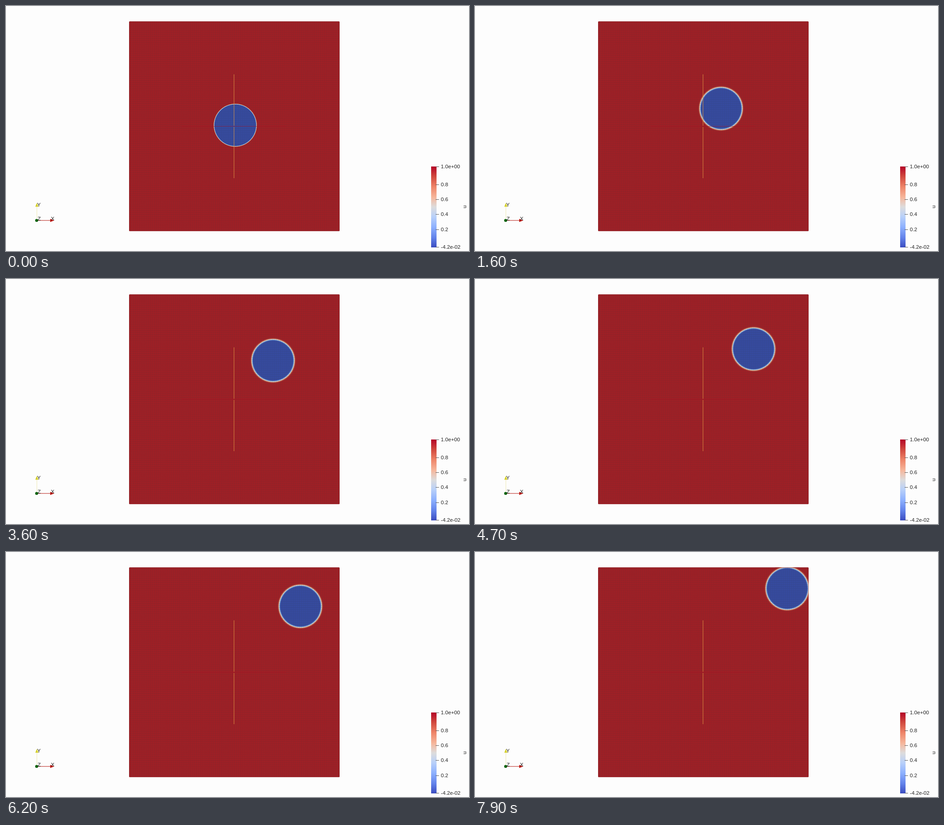
These frames come from a looping animation (1027 px wide and 545 px high, 8000 ms). An HTML page:

```html
<!DOCTYPE html>
<html lang="en">
<head>
<meta charset="utf-8">
<title>Transported disc</title>
<style>
  html, body { margin: 0; width: 100%; height: 100%; overflow: hidden; background: #fdfdfd; }
  svg { display: block; width: 100vw; height: 100vh; }
  text { font: 11.7px "Liberation Sans", Arial, sans-serif; fill: #222; }
</style>
</head>
<body>
<svg viewBox="0 0 1027 545">
  <defs>
    <radialGradient id="disc" gradientUnits="userSpaceOnUse" cx="0" cy="0" r="54"></radialGradient>
    <linearGradient id="scale" x1="0" y1="0" x2="0" y2="1">
      <stop offset="0" stop-color="#b40426"/>
      <stop offset=".12" stop-color="#d0473d"/>
      <stop offset=".25" stop-color="#ee8468"/>
      <stop offset=".38" stop-color="#f6b69b"/>
      <stop offset=".5" stop-color="#dddcdc"/>
      <stop offset=".62" stop-color="#b8d0f9"/>
      <stop offset=".75" stop-color="#8db0fe"/>
      <stop offset=".88" stop-color="#6282ea"/>
      <stop offset="1" stop-color="#3b4cc0"/>
    </linearGradient>
    <pattern id="mesh" x="273" y="34.5" width="4.66" height="4.66" patternUnits="userSpaceOnUse">
      <path d="M0 .6H4.66M.6 0V4.66" stroke="#28323c" stroke-opacity=".13"/>
    </pattern>
    <clipPath id="plate"><rect x="273" y="34.3" width="467" height="466.4" rx="1.5"/></clipPath>
  </defs>

  <rect width="1027" height="545" fill="#fdfdfd"/>

  <g clip-path="url(#plate)">
    <rect x="273" y="34" width="467" height="467" fill="#a01f25"/>
    <circle id="ball" r="54" fill="url(#disc)"/>
    <rect x="273" y="34" width="467" height="467" fill="url(#mesh)"/>
  </g>
  <rect x="273.5" y="34.8" width="466" height="465.4" rx="1" fill="none" stroke="#8c1c22" stroke-opacity=".5"/>

  <path d="M390 267.5H621" stroke="#ab1020" stroke-opacity=".6"/>
  <path d="M505.8 152V266.5M505.8 269V383" stroke="#e59a45" stroke-opacity=".9"/>

  <g id="axes">
    <path d="M68.5 477V446" stroke="#efe9b5"/>
    <path d="M68 477H99" stroke="#c03a32" stroke-width="1.2"/>
    <path d="M68.3 438L72 446.5H65Z" fill="#d5d02c"/>
    <path d="M107 477L98 473.5V480.5Z" fill="#c01a14"/>
    <circle cx="68" cy="477" r="3.3" fill="#0b650f"/>
    <text x="69" y="446">Y</text>
    <text x="99.5" y="477">X</text>
    <text x="70" y="477">Z</text>
  </g>

  <rect x="943" y="357" width="12" height="180" fill="url(#scale)"/>
  <g id="ticks"></g>
  <text transform="translate(1020.5 450) rotate(-90)">u</text>
</svg>
<script>
const LOOP = 8000, STEP = 100, RING = 47, REACH = 54;
const $ = id => document.getElementById(id);

function add(parent, tag, attrs, text = "") {
  const el = document.createElementNS("http://www.w3.org/2000/svg", tag);
  for (const key in attrs) el.setAttribute(key, attrs[key]);
  el.textContent = text;
  return parent.appendChild(el);
}

const labels = [
  [357.5, "1.0e+00"], [397.5, "0.8"], [430.5, "0.6"],
  [463.5, "0.4"], [497.5, "0.2"], [536.5, "-4.2e-02"]
];
for (const [y, label] of labels) {
  add($("ticks"), "path", { d: `M953 ${y}H960.5`, stroke: "#555" });
  add($("ticks"), "text", { x: 964.5, y: y + 3.5 }, label);
}

// Colour bands across the interface: distance from the ring, colour.
const bands = [
  [-3.6, "#364a9f"], [-2, "#4565b8"], [-1, "#8fb2dc"], [0, "#d3d2cc"],
  [0.8, "#dca487"], [1.9, "#b5493f"], [3.8, "#a01f25"]
];
const stops = bands.map(([, color]) => add($("disc"), "stop", { "stop-color": color }));

function draw(time) {
  const n = Math.floor((time % LOOP) / STEP);
  const spread = 1 - 0.55 * Math.exp(-n / 3);
  bands.forEach(([d], i) => stops[i].setAttribute("offset", (RING + d * spread) / REACH));
  const shift = 2.329 * n;
  $("ball").setAttribute("transform", `translate(${508.5 + shift} ${265.2 - shift})`);
}

const start = performance.now();
function tick() {
  draw(performance.now() - start);
  requestAnimationFrame(tick);
}
tick();
</script>
</body>
</html>
```
